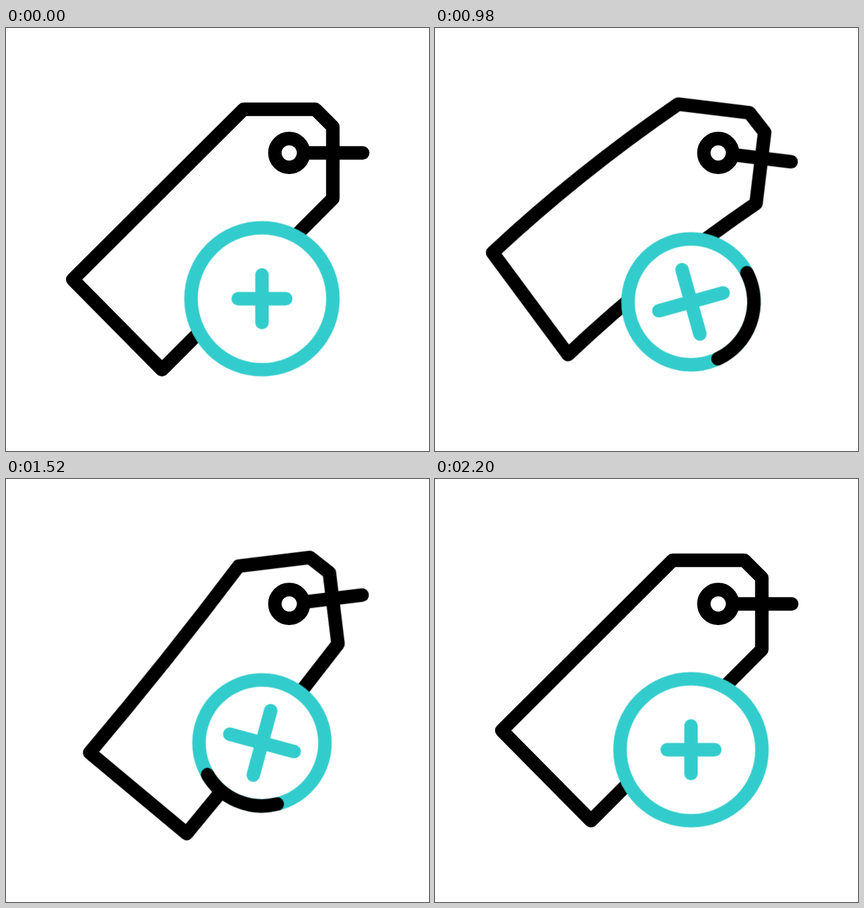
An HTML page that plays this animation: 640 px wide and 640 px high, repeating every 2400 ms.

```html
<!DOCTYPE html>
<html lang="en">
<head>
<meta charset="utf-8">
<title>Add tag</title>
<style>
  @property --tail { syntax: "<number>"; inherits: false; initial-value: 0; }
  @property --head { syntax: "<number>"; inherits: false; initial-value: 0; }

  html, body { margin: 0; width: 100%; height: 100%; overflow: hidden; background: #fff; }
  svg { display: block; width: 100%; height: 100%; }
  svg * { fill: none; stroke-width: 20.4px; stroke-linecap: round; stroke-linejoin: round; }

  .black { stroke: #000; }
  .teal { stroke: #33cccc; }
  .disc { fill: #fff; }

  .swing, .body, .badge, .disc, .turn, .plus {
    animation: 2400ms cubic-bezier(.3333, 0, .6667, 1) infinite;
  }
  .swing { transform-origin: 428.5px 189px; animation-name: swing; }
  .body { animation-name: bend; }
  .badge { animation-name: bob; }
  .disc { animation-name: shrink; }
  .turn { animation-name: turn; }
  .plus { animation-name: grow; }
  .arc {
    stroke-dasharray: calc((var(--head) - var(--tail)) * 1px) 800px;
    stroke-dashoffset: calc(var(--tail) * -1px);
    animation: head 2400ms cubic-bezier(.25, 0, .75, 1) infinite,
               tail 2400ms cubic-bezier(.25, 0, .75, 1) infinite,
               show 2400ms step-end infinite;
  }

  @keyframes swing {
    0%, 8.3333% { transform: rotate(0deg); }
    29.1667% { transform: rotate(-15deg); }
    50% { transform: rotate(22deg); }
    66.6667% { transform: rotate(-10.2deg); }
    83.3333%, 100% { transform: rotate(0deg); }
  }
  /* The free end of the tag lags behind the swing. */
  @keyframes bend {
    0%, 8.3333%, 87.5%, 100% {
      d: path("M359.5 123L468 123L494.5 149.5L494.5 258Q365.3 387.5 236 517L101 380.5Q230.3 251.8 359.5 123Z");
    }
    33.3333% {
      d: path("M359.5 123L468 123L494.5 149.5L494.5 258Q340.3 363.7 249.2 527.8L113.6 389Q205 226.8 359.5 123Z");
    }
    54.1667% {
      d: path("M359.5 123L468 123L494.5 149.5L494.5 258Q390.2 417.9 217.5 499.3L94.3 358.8Q264.1 282.7 359.5 123Z");
    }
    70.8333% {
      d: path("M359.5 123L468 123L494.5 149.5L494.5 258Q345.7 370.6 243.6 526.8L107 388.5Q209.9 234 359.5 123Z");
    }
  }
  @keyframes bob {
    0%, 8.3333%, 91.6667%, 100% { transform: translate(387.3px, 409.6px); }
    29.1667%, 70.8333% { transform: translate(387.3px, 384.6px); }
    50% { transform: translate(387.3px, 434.8px); }
  }
  @keyframes shrink {
    0%, 8.3333%, 91.6667%, 100% { r: 107.4px; }
    33.3333%, 66.6667% { r: 95.3px; }
  }
  @keyframes turn {
    0%, 8.3333%, 91.6667%, 100% { transform: rotate(0deg); }
    33.3333% { transform: rotate(-26.4deg); }
    58.3333% { transform: rotate(23.4deg); }
    75% { transform: rotate(-14.3deg); }
  }
  @keyframes grow {
    0%, 8.3333%, 91.6667%, 100% { d: path("M-36 0L36 0M0 -36L0 36"); }
    33.3333%, 66.6667% { d: path("M-50.5 0L50.5 0M0 -50.5L0 50.5"); }
  }
  @keyframes head {
    0%, 29.1667% { --head: 0; }
    66.6667%, 100% { --head: 360; }
  }
  @keyframes tail {
    0%, 41.6667% { --tail: 0; }
    72.5%, 100% { --tail: 360; }
  }
  @keyframes show {
    0% { visibility: hidden; }
    29.5% { visibility: visible; }
    72.4%, 100% { visibility: hidden; }
  }
</style>
</head>
<body>
<svg viewBox="0 0 640 640">
  <g class="swing black">
    <path class="body" d="M359.5 123L468 123L494.5 149.5L494.5 258Q365.3 387.5 236 517L101 380.5Q230.3 251.8 359.5 123Z"/>
    <path d="M452 189H539.7"/>
  </g>
  <circle class="black" cx="428.5" cy="189" r="21.7"/>
  <g class="badge">
    <circle class="disc teal" r="107.4"/>
    <circle class="arc black" r="95.3" pathLength="360" transform="rotate(64.6) scale(1 -1)"/>
    <g class="turn teal"><path class="plus" d="M-36 0L36 0M0 -36L0 36"/></g>
  </g>
</svg>
</body>
</html>
```
